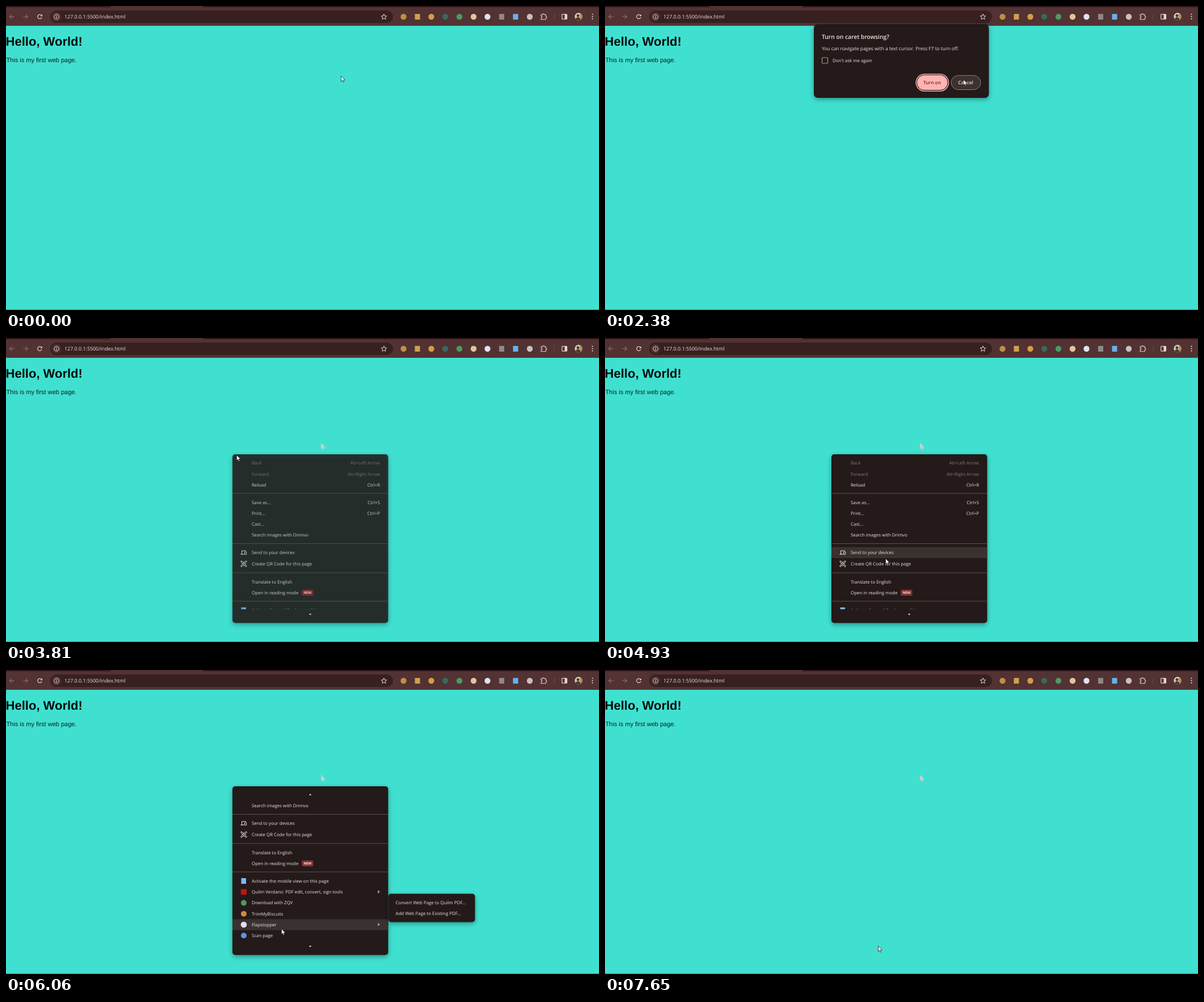
These frames come from a looping animation (1045 px wide and 536 px high, 8000 ms). An HTML page with a canvas:

```html
<!DOCTYPE html>
<html lang="en">
<head>
<meta charset="utf-8">
<title>Caret browsing and page menu</title>
<style>
  html, body { margin: 0; width: 100%; height: 100%; overflow: hidden; background: #40e0d0; }
  canvas { display: block; width: 1045px; height: 536px; }
</style>
</head>
<body>
<canvas id="stage" width="1045" height="536"></canvas>
<script>
const ctx = document.getElementById('stage').getContext('2d');
const LOOP = 8000;
const UI = '"Open Sans", "Noto Sans", sans-serif';
const PAGE = '"Liberation Sans", Arial, sans-serif';
const PANEL = '#231a19', HOVER = '#3a3231', TEXT = '#ece4e3', DIM = '#817a79', LINE = '#5a5250';

const clamp = v => Math.max(0, Math.min(1, v));
const ramp = (t, a, b) => clamp((t - a) / (b - a));

// Pointer path: time, x, y
const PATH = [
  [0, 590, 123], [1440, 590, 123], [1780, 645, 127], [1960, 670, 132], [2190, 631, 129],
  [3070, 631, 132], [3170, 555, 185], [3300, 430, 211], [3390, 399, 205], [3550, 399, 205],
  [3770, 406, 206], [4500, 406, 206], [4930, 494, 388], [5130, 494, 487], [5290, 491, 483],
  [5570, 491, 483], [5780, 488, 393], [6060, 485, 456], [6370, 484, 452], [6600, 480, 444],
  [6900, 477, 468], [7190, 473, 479], [7419, 473, 479], [7420, 482, 484], [7649, 482, 484],
  [7650, 481, 486], [8000, 481, 486]
];
const SCROLL = [[5180, 20], [5220, 42], [5280, 64], [5340, 80], [5370, 94], [5570, 108]];

function slope(i, k) {
  const a = PATH[i - 1], b = PATH[i], c = PATH[i + 1];
  if (!a || !c) return 0;
  const before = b[k] - a[k], after = c[k] - b[k];
  return before * after <= 0 || c[0] - b[0] > 700 || b[0] - a[0] > 700
    ? 0 : (c[k] - a[k]) / (c[0] - a[0]);
}

function pointer(t) {
  let i = 0;
  while (i < PATH.length - 2 && t >= PATH[i + 1][0]) i++;
  const a = PATH[i], b = PATH[i + 1], d = b[0] - a[0], u = (t - a[0]) / d;
  if (d === 1) return { x: a[1], y: a[2] };
  const at = k => (2 * u ** 3 - 3 * u * u + 1) * a[k] + (3 * u * u - 2 * u ** 3) * b[k]
    + (u ** 3 - 2 * u * u + u) * d * slope(i, k) + (u ** 3 - u * u) * d * slope(i + 1, k);
  return { x: at(1), y: at(2) };
}

function text(s, x, y, color, size, { weight = 400, align = 'left', face = UI } = {}) {
  ctx.font = `${weight} ${size}px ${face}`;
  ctx.textAlign = align;
  ctx.fillStyle = color;
  ctx.fillText(s, x, y);
}
function rect(x, y, w, h, color) {
  ctx.fillStyle = color;
  ctx.fillRect(x, y, w, h);
}
function round(x, y, w, h, r, fill, stroke, width = 1) {
  ctx.beginPath();
  ctx.roundRect(x, y, w, h, r);
  if (fill) { ctx.fillStyle = fill; ctx.fill(); }
  if (stroke) { ctx.strokeStyle = stroke; ctx.lineWidth = width; ctx.stroke(); }
}
function dot(x, y, r, color) {
  ctx.beginPath();
  ctx.arc(x, y, r, 0, 7);
  ctx.fillStyle = color;
  ctx.fill();
}
function poly(points, fill, stroke, width = 1, close = true) {
  ctx.beginPath();
  points.forEach(([x, y]) => ctx.lineTo(x, y));
  if (close) ctx.closePath();
  if (fill) { ctx.fillStyle = fill; ctx.fill(); }
  if (stroke) { ctx.strokeStyle = stroke; ctx.lineWidth = width; ctx.stroke(); }
}
function panel(x, y, w, h, r) {
  ctx.save();
  ctx.shadowColor = 'rgba(0,0,0,.35)';
  ctx.shadowBlur = 8;
  ctx.shadowOffsetY = 3;
  round(x, y, w, h, r, PANEL);
  ctx.restore();
}
function arrow(x, y, fill, stroke) {
  const shape = [[0, 0], [0, 9.6], [2.2, 7.6], [3.7, 11], [5.2, 10.3], [3.8, 7.1], [6.8, 6.9]];
  poly(shape.map(([a, b]) => [x + .5 + a, y + .5 + b]), fill, stroke, .8);
}

function backArrow(x, dir) {
  const c = '#8d7070';
  poly([[x - 4 * dir, 18.7], [x + 4 * dir, 18.7]], null, c, 1.1, false);
  poly([[x, 14.8], [x - 4 * dir, 18.7], [x, 22.6]], null, c, 1.1, false);
}

const BADGES = [
  [700.5, '#bd9049'], [725, '#cfa052', 1], [749.5, '#d99a48'], [774, '#39695d'], [799, '#4c9a62'],
  [824, '#e3c39c'], [848.5, '#dfe1ec'], [873.5, '#8f8886', 1], [898, '#6aaef0', 1], [923, '#cdbfbf']
];

function toolbar() {
  const light = '#e6d4d4';
  rect(0, 0, 1045, 35, '#523232');
  rect(0, 0, 1045, 2.2, '#331819');
  round(184, -4, 164, 8, 3, '#523232');
  rect(0, 34, 1045, 1, '#4b4746');
  backArrow(10.5, 1);
  backArrow(34.5, -1);
  ctx.strokeStyle = light;
  ctx.lineWidth = 1.2;
  ctx.beginPath();
  ctx.arc(59.5, 18.8, 3.7, .3, 5.5);
  ctx.stroke();
  poly([[63.8, 14.5], [63.8, 18], [60.3, 18]], light);

  round(78, 8, 604, 22, 11, '#382021');
  dot(89, 19, 8, '#4d3232');
  ctx.beginPath();
  ctx.arc(89, 19, 4.2, 0, 7);
  ctx.strokeStyle = light;
  ctx.lineWidth = 1;
  ctx.stroke();
  rect(88.5, 18.4, 1.1, 3, light);
  rect(88.5, 16.5, 1.1, 1.1, light);
  text('127.0.0.1:5500/index.html', 103, 22.2, '#ede0df', 8.9);
  const star = Array.from({ length: 10 }, (_, i) => {
    const a = i * Math.PI / 5 - Math.PI / 2, r = i % 2 ? 2.3 : 5.2;
    return [666 + r * Math.cos(a), 19.2 + r * Math.sin(a)];
  });
  poly(star, null, light, 1);

  BADGES.forEach(([x, c, square]) => square ? rect(x - 4.5, 14, 9, 10, c) : dot(x, 19, 5.2, c));

  // Puzzle piece
  ctx.beginPath();
  ctx.moveTo(943, 15.2);
  ctx.lineTo(945.7, 15.2);
  ctx.arc(947, 14.9, 1.4, Math.PI, 0);
  ctx.lineTo(951.2, 15.2);
  ctx.lineTo(951.2, 18);
  ctx.arc(951.5, 19.4, 1.4, -Math.PI / 2, Math.PI / 2);
  ctx.lineTo(951.2, 23.7);
  ctx.lineTo(943, 23.7);
  ctx.lineTo(943, 21);
  ctx.arc(943.2, 19.4, 1.5, Math.PI / 2, -Math.PI / 2, true);
  ctx.closePath();
  ctx.strokeStyle = light;
  ctx.lineWidth = 1.1;
  ctx.stroke();

  rect(965.5, 13, 1, 11, '#6f4a4a');
  round(979.7, 14.7, 8.8, 8.4, 1, null, light, 1.2);
  rect(984.5, 14.7, 4, 8.4, light);

  // Avatar
  ctx.save();
  ctx.beginPath();
  ctx.arc(1009, 18.8, 6.7, 0, 7);
  ctx.clip();
  rect(1002, 12, 14, 14, '#d8cdc2');
  rect(1011.5, 12, 5, 14, '#b28a48');
  dot(1008, 17, 2.5, '#493934');
  dot(1008, 24, 4.2, '#493934');
  ctx.restore();
  [14.5, 18.6, 22.7].forEach(y => dot(1033.5, y, 1.1, light));
}

function page() {
  rect(0, 35, 1045, 501, '#40e0d0');
  rect(0, 535, 1045, 1, '#2f8d87');
  text('Hello, World!', -.4, 70, '#050d0c', 22, { weight: 700, face: PAGE });
  text('This is my first web page.', .4, 99.4, '#0a2422', 11, { face: PAGE });
}

function dialog(t, p) {
  const alpha = Math.min(ramp(t, 0, 200), 1 - ramp(t, 2800, 3040));
  if (t < 30 || alpha <= 0) return;
  ctx.globalAlpha = alpha;
  panel(368, 32, 308.5, 130, 7);
  text('Turn on caret browsing?', 382, 58.3, '#f1e5e4', 10.3, { weight: 600 });
  text('You can navigate pages with a text cursor. Press F7 to turn off.', 382, 78.2, TEXT, 8.4);
  round(382.5, 91, 10, 10, 1, null, '#a59491', 1.2);
  text("Don't ask me again", 401, 99, TEXT, 7.88);
  round(548.2, 120.2, 57.2, 29.8, 14.9, null, '#ffb3b3', 1.5);
  round(550, 122, 53.5, 26, 13, '#ffb3b3');
  text('Turn on', 576.5, 138.3, '#6d2529', 8.3, { weight: 600, align: 'center' });
  const over = ramp(p.x, 608, 613);
  round(610, 122.5, 52, 25, 12.5, over ? `rgba(255,240,238,${.11 * over})` : null, '#8f7d7b', 1);
  const press = ramp(t, 2450, 2750);
  if (press > 0) {
    ctx.save();
    round(610, 122.5, 52, 25, 12.5);
    ctx.clip();
    dot(631, 130, 8 + 36 * press, 'rgba(255,218,216,.1)');
    ctx.restore();
  }
  text('Cancel', 635.5, 138.3, '#ffdcda', 8.3, { weight: 600, align: 'center' });
  ctx.globalAlpha = 1;
}

// Label, centre y, options
const ROWS = [
  ['Back', 220.5, { key: 'Alt+Left Arrow', off: true }],
  ['Forward', 240, { key: 'Alt+Right Arrow', off: true }],
  ['Reload', 259, { key: 'Ctrl+R' }],
  ['Save as...', 290, { key: 'Ctrl+S' }],
  ['Print...', 309, { key: 'Ctrl+P' }],
  ['Cast...', 328.3, {}],
  ['Search images with Drimvo', 347.6, {}],
  ['Send to your devices', 378.3, { icon: devices }],
  ['Create QR Code for this page', 398.6, { icon: codeFrame }],
  ['Translate to English', 430, {}],
  ['Open in reading mode', 449.3, { tag: 'NEW' }],
  ['Activate the mobile view on this page', 480, { icon: y => rect(414.5, y - 5, 8.5, 10, '#7db8f2') }],
  ['Quilm Verdano: PDF edit, convert, sign tools', 499.3, { icon: y => rect(414, y - 5, 10, 10, '#c5130c'), sub: true }],
  ['Download with ZQV', 518.6, { icon: y => dot(419, y, 5, '#4c9a62') }],
  ['TrimMyBiscuits', 537.9, { icon: y => dot(419, y, 5, '#d0893c') }],
  ['Flapstopper', 557, { icon: y => dot(419, y, 5.3, '#dfe1ec'), sub: true }],
  ['Scan page', 576.3, { icon: y => dot(419, y, 5, '#5a93e6') }]
];
const BREAKS = [274, 362.5, 414, 464];

function devices(y) {
  poly([[423, y - 3.2], [415.5, y - 3.2], [415.5, y + 2.5]], null, TEXT, 1, false);
  rect(413.5, y + 2.3, 6, 1.2, TEXT);
  round(420.5, y - 1.3, 3.2, 4.6, .6, null, TEXT, 1);
}
function codeFrame(y) {
  for (const sx of [-1, 1]) for (const sy of [-1, 1]) {
    const x = 419 + sx * 5, v = y - .5 + sy * 5;
    poly([[x - sx * 2.4, v], [x, v], [x, v - sy * 2.4]], null, TEXT, .9, false);
    round(419 + sx * 2 - 1.4, y - .5 + sy * 2 - 1.4, 2.8, 2.8, .7, null, TEXT, 1);
  }
}

function menu(t, p) {
  if (t < 3550 || t >= 7650) return;
  const step = SCROLL.filter(s => t >= s[0]).pop();
  const scroll = step ? step[1] : 0;
  const top = scroll ? 230 : 205, bottom = 478.3;
  ctx.globalAlpha = 1 - (1 - ramp(t, 3530, 4120)) ** 3;
  panel(399, 205, 274.5, 297.5, 5);

  ctx.save();
  ctx.beginPath();
  ctx.rect(399, top, 274.5, bottom - top);
  ctx.clip();
  const inside = p.x >= 399 && p.y > top && p.y < bottom;
  const gap = row => Math.abs(row[1] - scroll - p.y);
  const near = ROWS.reduce((a, b) => gap(b) < gap(a) ? b : a);
  if (inside && !near[2].off && gap(near) < 10.3) rect(399, near[1] - scroll - 9.6, 274.5, 19.3, HOVER);

  BREAKS.forEach(y => rect(399, y - scroll - .5, 274.5, 1, LINE));
  for (const [label, cy, o] of ROWS) {
    const y = cy - scroll;
    if (y < top - 12 || y > bottom + 12) continue;
    const color = o.off ? DIM : TEXT;
    text(label, 433, y + 2.8, color, 7.88);
    if (o.key) text(o.key, 659, y + 2.8, color, 7.88, { align: 'right' });
    if (o.icon) o.icon(y);
    if (o.sub) poly([[655.3, y - 3], [655.3, y + 2.6], [659, y - .2]], '#aaa2a1');
    if (o.tag) {
      round(521.3, y - 5.5, 20.2, 10.4, 2, '#843234');
      text(o.tag, 531.4, y + 2, '#ffe2e0', 6, { weight: 700, align: 'center' });
    }
  }
  ctx.restore();

  poly([[533.7, 486.2], [538.5, 486.2], [536.1, 488.7]], TEXT);
  if (scroll) poly([[533.7, 220.7], [538.5, 220.7], [536.1, 218.2]], TEXT);
  ctx.globalAlpha = 1;

  submenu(394.5, 153, ['Convert Web Page to Quilm PDF...', 'Add Web Page to Existing PDF...'],
    Math.min(ramp(t, 5840, 5980), 1 - ramp(t, 6230, 6370)));
  submenu(452, 89.5, ['Settings', 'Help'],
    Math.min(ramp(t, 6400, 6560), 1 - ramp(t, 7000, 7190)));
}

function submenu(y, w, labels, alpha) {
  if (alpha <= 0) return;
  ctx.globalAlpha = alpha;
  panel(673.5, y, w, 50, 5);
  labels.forEach((s, i) => text(s, 686.5, y + 18.4 + i * 19.3, TEXT, 7.88));
  ctx.globalAlpha = 1;
}

function draw(t) {
  const p = pointer(t);
  ctx.textRendering = 'geometricPrecision';
  page();
  toolbar();
  dialog(t, p);
  if (t >= 3170) arrow(555, 185, '#c8d0cd', '#c8d0cd');
  menu(t, p);
  arrow(p.x, p.y, '#fff', '#1c2424');
}

const start = performance.now();
function tick() {
  draw((performance.now() - start) % LOOP);
  requestAnimationFrame(tick);
}
tick();
</script>
</body>
</html>
```
